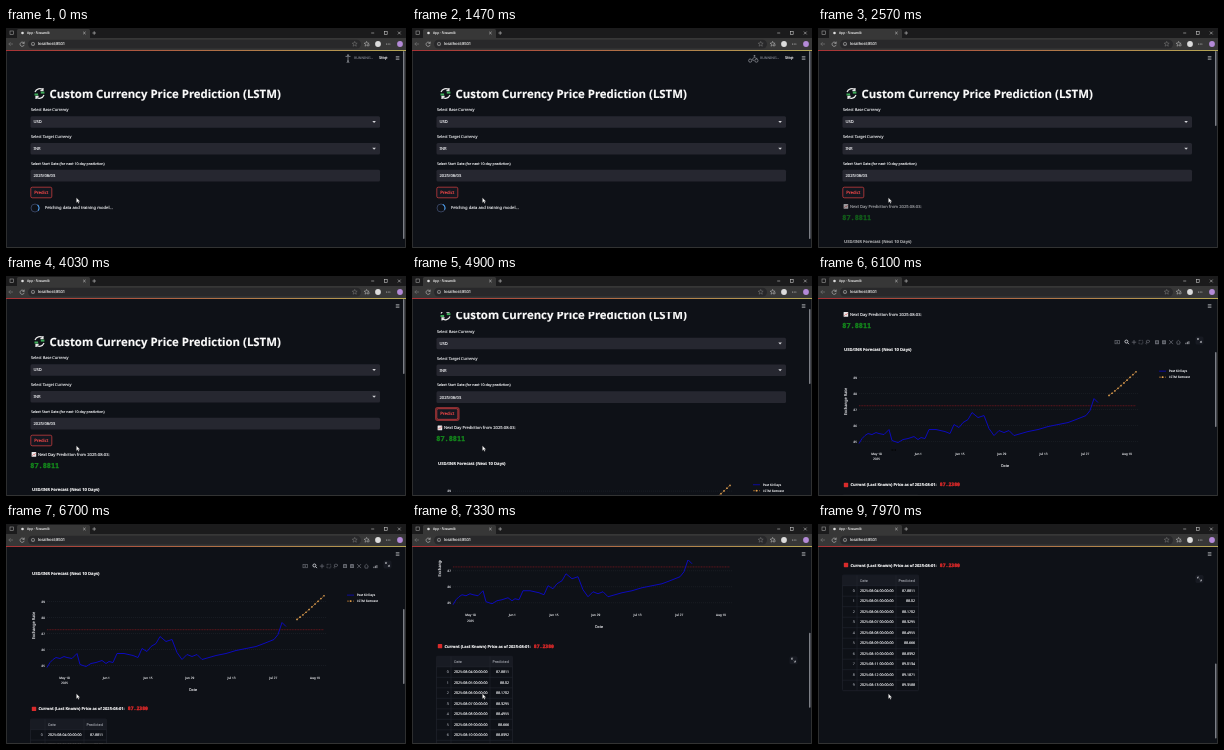
An HTML page for the animation above (8000 ms loop, 400 px wide and 220 px high).

```html
<!DOCTYPE html>
<html lang="en">
<head>
<meta charset="utf-8">
<title>Currency prediction</title>
<style>
  html, body { margin: 0; width: 100%; height: 100%; overflow: hidden; background: #0e1117; }
  svg { display: block; width: 400px; height: 220px; }
  text { font-family: "Noto Sans", "Open Sans", sans-serif; text-rendering: geometricPrecision; white-space: pre; }
  .mono { font-family: "Noto Sans Mono", "DejaVu Sans Mono", monospace; }
</style>
</head>
<body>
<svg id="stage" viewBox="0 0 400 220"></svg>
<script>
const LOOP = 8000, RESULT_AT = 2400, IDLE_AT = 2480;
const BG = '#0e1117', FIELD = '#262730', INK = '#e6e7ea', RED = '#ff4b4b';
const stage = document.getElementById('stage');

function add(parent, tag, attrs = {}) {
  const node = document.createElementNS('http://www.w3.org/2000/svg', tag);
  for (const key in attrs) node.setAttribute(key, attrs[key]);
  parent.append(node);
  return node;
}
const group = (parent, attrs) => add(parent, 'g', attrs);
const rect = (parent, x, y, width, height, fill, more) =>
  add(parent, 'rect', { x, y, width, height, fill, ...more });
const circle = (parent, cx, cy, r, fill, more) => add(parent, 'circle', { cx, cy, r, fill, ...more });
const path = (parent, d, stroke, width = 0.7, more) =>
  add(parent, 'path', { d, stroke, 'stroke-width': width, fill: 'none', ...more });

// y is the middle of the capitals; the thin stroke keeps tiny letters legible
function text(parent, value, x, y, size, fill = INK, more = {}) {
  const node = add(parent, 'text', {
    x, y: y + size * 0.36, 'font-size': size, fill, stroke: fill, 'stroke-width': 0.14, ...more
  });
  node.textContent = value;
  return node;
}
const BOLD = { 'font-weight': 700 };
const MIDDLE = { 'text-anchor': 'middle' };
const END = { 'text-anchor': 'end' };

function expandIcon(parent, y) {
  const icon = group(parent, { transform: `translate(381.5 ${y})` });
  rect(icon, -4, -4, 8, 8, '#171a22', { rx: 1.5 });
  path(icon, 'M-0.5 -0.5 L-1.8 -1.8 M-2 -0.4 V-2 H-0.4 M0.5 0.5 L1.8 1.8 M2 0.4 V2 H0.4', '#c4c6cb', 0.6);
  return icon;
}

rect(stage, 0, 0, 400, 220, BG);
const page = group(stage);

// Form
path(page, 'M29 64 a5 5 0 0 1 8 -2 m0 -2 v2.6 h-2.6 M38 67 a5 5 0 0 1 -8 2 m0 2 v-2.6 h2.6', '#e9e9e9', 1.2);
rect(page, 28.5, 65.5, 3.6, 2, '#3fae5a');
rect(page, 34.8, 63.6, 3.6, 2, '#3fae5a');
text(page, 'Custom Currency Price Prediction (LSTM)', 43.5, 65.5, 11.4, '#fafafa', BOLD);

function field(label, size, value, y, isSelect) {
  text(page, label, 25, y - 12, size);
  rect(page, 24.5, y - 5.8, 349.5, 11.6, FIELD, { rx: 1.5 });
  text(page, value, 27.5, y, 4.1);
  if (isSelect) path(page, `M366.3 ${y - 0.9} h3.6 l-1.8 2 z`, 'none', 0, { fill: '#d5d6da' });
}
field('Select Base Currency', 3.85, 'USD', 94, true);
field('Select Target Currency', 3.85, 'INR', 120.7, true);
field('Select Start Date (for next 10-day prediction)', 3.56, '2025/08/03', 147.6, false);

const focusRing = rect(page, 23.7, 158.2, 23.2, 12.6, 'none',
  { rx: 2, stroke: RED, 'stroke-opacity': 0.5, 'stroke-width': 1.4 });
rect(page, 24.8, 159.2, 21, 10.6, '#131720', { rx: 1.5, stroke: RED, 'stroke-width': 0.6 });
text(page, 'Predict', 35.3, 164.4, 4.3, RED, MIDDLE);

// Waiting state
const waiting = group(page);
circle(waiting, 29, 180, 4, 'none', { stroke: '#34405c', 'stroke-width': 1 });
const spinner = path(waiting, 'M29 176 a4 4 0 0 1 4 4', '#4aa3f5', 1.1);
text(waiting, 'Fetching data and training model...', 39, 180, 4.13);

// Result
const result = group(page);
rect(result, 25.6, 176, 4.6, 4.8, '#e8e8ea', { rx: 0.5 });
path(result, 'M26.3 179.8 l1.2 -1.4 l0.8 0.6 l1.3 -2', '#d64545', 0.6);
text(result, 'Next Day Prediction from 2025-08-03:', 32, 178.5, 4.09);
text(result, '87.8811', 24.3, 189.2, 6.9, '#14891c', { ...BOLD, class: 'mono', 'stroke-width': 0.3 });

// Chart
const details = group(result, { transform: 'translate(0 0.6)' });
const rateY = rate => 273 - 16 * (rate - 87);
text(details, 'USD/INR Forecast (Next 10 Days)', 26, 213, 4.16, '#f4f4f5', BOLD);
for (let rate = 85; rate <= 89; rate++) {
  path(details, `M41 ${rateY(rate)} H320`, '#22262f', 0.5, { 'stroke-dasharray': '1 1' });
  text(details, rate, 39, rateY(rate), 3.1, '#c9cbd0', END);
}
['May 18', 'Jun 1', 'Jun 15', 'Jun 29', 'Jul 13', 'Jul 27', 'Aug 10'].forEach((day, i) =>
  text(details, day, 58.5 + 41.75 * i, 317, 3.1, '#d5d6da', MIDDLE));
text(details, '2025', 58.5, 322.7, 3.1, '#d5d6da', MIDDLE);
text(details, 'Date', 187, 329, 3.7, '#d5d6da', MIDDLE);
text(details, 'Exchange Rate', 27.5, 265, 4, '#d5d6da', { ...MIDDLE, transform: 'rotate(-90 27.5 265)' });

const past = '41,307 44,302 47,299 50,297 54,298 58,296 61,297 66,298 71,293 74,304 80,306 85,303 90,302 ' +
  '96,300 100,303 103,301 107,302 111,293 118,293 127,295 132,297 136,288 141,291 145,286 150,283 154,276 ' +
  '160,281 166,279 171,292 176,299 181,294 186,296 191,294 196,299 203,297 210,295 220,293 230,290 240,288 ' +
  '250,286 258,283 268,279 272,274 276,262 280,266';
path(details, `M41 ${rateY(87.238)} H318`, '#98181f', 0.6, { 'stroke-dasharray': '1 0.6' });
add(details, 'polyline', { points: past, fill: 'none', stroke: '#0c0abc', 'stroke-width': 1 });

const forecast = ['87.8811', '88.02', '88.1702', '88.3295', '88.4955',
  '88.666', '88.8392', '89.0134', '89.1871', '89.3588'];
const forecastPoints = forecast.map((rate, i) => [291 + 3 * i, rateY(rate)]);
add(details, 'polyline', {
  points: forecastPoints.join(' '), fill: 'none', stroke: '#c98436', 'stroke-width': 0.6, 'stroke-dasharray': '2 1'
});
forecastPoints.forEach(([x, y]) => circle(details, x, y, 0.85, '#e2a252'));

path(details, 'M341 234.6 h7', '#0c0abc', 0.8);
text(details, 'Past 60 Days', 351, 234.6, 3.05);
path(details, 'M341 240.6 h7', '#c98436', 0.7, { 'stroke-dasharray': '2 1' });
circle(details, 344.5, 240.6, 0.9, '#e2a252');
text(details, 'LSTM Forecast', 351, 240.6, 3.1);

// Chart tools
const tools = group(result);
const GREY = '#666971';
rect(tools, 297, 204.6, 4.4, 3.2, 'none', { stroke: GREY, 'stroke-width': 0.7 });
circle(tools, 299.2, 206.2, 0.8, GREY);
circle(tools, 308.4, 205.6, 1.5, 'none', { stroke: '#d0d1d6', 'stroke-width': 0.9 });
path(tools, 'M309.6 206.8 l1.4 1.4', '#d0d1d6', 0.9);
path(tools, 'M316 204 v4.4 M313.8 206.2 h4.4', GREY, 0.8);
rect(tools, 321, 204.4, 3.8, 3.6, 'none', { stroke: GREY, 'stroke-width': 0.7, 'stroke-dasharray': '0.8 0.6' });
path(tools, 'M328.5 208.4 q-1 -1 0 -1.6 q-1 -2.6 1.4 -2.6 q2.4 0.2 1.6 1.8 q-1 1.2 -3 0.8', GREY, 0.7);
[339, 346].forEach((x, i) => {
  rect(tools, x - 2, 204.2, 4, 4, GREY, { rx: 0.4 });
  path(tools, `M${x - 1.2} 206.2 h2.4` + (i ? '' : ` M${x} 205 v2.4`), BG, 0.6);
});
path(tools, 'M351.2 204.2 l3.8 4 m0 -4 l-3.8 4', GREY, 0.8);
path(tools, 'M358.2 206.4 l2.2 -2 l2.2 2 M359 206.2 v2 h2.8 v-2', GREY, 0.7);
path(tools, 'M367.9 208.2 v-1.4 M369.4 208.2 v-2.4 M370.9 208.2 v-3', '#a6a8ae', 0.9);
const chartExpand = expandIcon(result, 204.5);

// Price and table
rect(details, 25.8, 346.2, 4.4, 4.4, '#d92b2b', { rx: 0.7 });
text(details, 'Current (Last Known) Price as of 2025-08-01:', 32.4, 348.5, 3.98, '#f4f4f5', BOLD);
text(details, '87.2380', 121.8, 348.2, 4.8, '#e62a2a', { ...BOLD, class: 'mono', 'stroke-width': 0.3 });

const ROW = 10.5, TOP = 358.6, LINE = '#242832';
rect(details, 24.5, TOP, 76, ROW * 11, BG, { stroke: LINE, 'stroke-width': 0.6, rx: 1 });
rect(details, 24.5, TOP, 76, ROW, '#181b23');
path(details, `M39 ${TOP} v${ROW * 11} M78 ${TOP} v${ROW * 11}`, LINE, 0.5);
text(details, 'Date', 42, TOP + 5.2, 3.55, '#92959d');
text(details, 'Predicted', 80.5, TOP + 5.2, 3.7, '#92959d');
forecast.forEach((rate, i) => {
  const y = TOP + ROW * (i + 1);
  path(details, `M24.5 ${y} h76`, LINE, 0.5);
  text(details, i, 36.8, y + 5, 3.55, '#92959d', END);
  text(details, `2025-08-${String(4 + i).padStart(2, '0')} 00:00:00`, 42, y + 5, 3.55);
  text(details, rate, 97, y + 5, 3.55, INK, END);
});
const tableExpand = expandIcon(result, 363);

// App header
rect(stage, 0, 22, 400, 14, BG);
path(stage, 'M389.8 28.6 h3.6 M389.8 30 h3.6 M389.8 31.4 h3.6', '#c8c9cd', 0.6);
const status = group(stage);
const poses = [
  'M342 29 v3 M339.5 28.4 h5 M342 32 l-1 3 M342 32 l1 3',
  'M338.2 32.6 m-1.6 0 a1.6 1.6 0 1 0 3.2 0 a1.6 1.6 0 1 0 -3.2 0 M342.8 32.6 a1.6 1.6 0 1 0 3.2 0 a1.6 1.6 0 1 0 -3.2 0 M341.5 33 l-1 -2 l2 -2 l1.4 1.4 h1.4',
  'M342.4 28.6 l-1 3 l2 1.4 l-0.6 2 M341.4 31.6 l-1 2 h-2 M339.4 30 l3 -1.2 l2.2 1.4',
  'M337.5 33.6 q1.2 -1.2 2.4 0 t2.4 0 t2.4 0 M338.6 32 l3 -2 l2 2'
].map((d, i) => {
  const pose = group(status);
  path(pose, d, '#898c94', 0.8);
  circle(pose, [342, 342.5, 343, 344.8][i], [27.2, 27.8, 27.2, 30.8][i], 0.9, '#898c94');
  return pose;
});
text(status, 'RUNNING...', 348, 30, 3.5, '#767982');
text(status, 'Stop', 373, 30, 3.9, '#f0f0f2');

const thumb = rect(stage, 397, 23, 1.5, 75, '#7c7f86', { rx: 0.7 });

// Browser
const CHROME = '#373737', ICON = '#c4c4c4', DIM = '#7c7c7c';
path(stage, 'M0.4 22 V219.5 H399.6 V22', CHROME, 0.9);
rect(stage, 0, 0, 400, 11, '#1b1b1c');
rect(stage, 11, 1, 73, 11, CHROME, { rx: 1.5 });
rect(stage, 0, 10, 400, 12, CHROME);
rect(stage, 22, 11.8, 333, 8.6, '#28282a', { rx: 4.3 });
rect(stage, 4, 3, 3.4, 3.4, 'none', { stroke: '#9a9a9a', 'stroke-width': 0.6 });
circle(stage, 16.5, 5, 1.3, '#dedede');
text(stage, 'App · Streamlit', 21, 5, 3.3, '#dedede');
path(stage, 'M77.2 3.8 l2.4 2.4 m0 -2.4 l-2.4 2.4', ICON, 0.6);
path(stage, 'M86.4 5 h3.6 m-1.8 -1.8 v3.6', ICON, 0.6);
path(stage, 'M365.2 5 h3 M391.9 3.6 l2.8 2.8 m0 -2.8 l-2.8 2.8', ICON, 0.6);
rect(stage, 378.4, 3.6, 2.8, 2.8, 'none', { stroke: ICON, 'stroke-width': 0.6 });
path(stage, 'M7 16 h-4.2 m1.8 -1.8 l-1.8 1.8 l1.8 1.8', DIM, 0.6);
path(stage, 'M18 15.2 a2.1 2.1 0 1 0 0.2 1.6 M18.2 13.6 v1.8 h-1.8', ICON, 0.6);
circle(stage, 27, 16, 1.7, 'none', { stroke: ICON, 'stroke-width': 0.5 });
path(stage, 'M27 15.7 v1.3', ICON, 0.5);
text(stage, 'localhost:8501', 32, 16, 4, '#dedede');

const star = 'l0.7 1.7 l1.8 0.1 l-1.4 1.2 l0.5 1.8 l-1.6 -1 l-1.6 1 l0.5 -1.8 l-1.4 -1.2 l1.8 -0.1 z';
path(stage, 'M348.7 13.4 ' + star, DIM, 0.5);
path(stage, 'M360.6 13.4 ' + star + ' M362 17 h2', ICON, 0.5);
circle(stage, 372, 16, 2.9, '#dcdcdc');
[380.5, 382.2, 383.9].forEach(x => circle(stage, x, 16, 0.5, ICON));
circle(stage, 394, 16, 2.9, '#b48ad8');
const ribbon = add(add(stage, 'defs'), 'linearGradient', { id: 'ribbon' });
add(ribbon, 'stop', { offset: 0, 'stop-color': '#b93639' });
add(ribbon, 'stop', { offset: 1, 'stop-color': '#c9b85c' });
rect(stage, 0, 22, 400, 0.9, 'url(#ribbon)');

// Pointer
const arrow = path(stage, 'M70.4 169.8 v5 l1.2 -1.1 l0.9 1.8 l0.8 -0.4 l-0.9 -1.7 h1.6 z', '#333', 0.3, { fill: '#fff' });
const resize = path(stage, 'M73.6 174 h4.4 m-1 -1 l1 1 l-1 1 M74.6 173 l-1 1 l1 1', '#000', 0.5);

// Page scroll as [time, offset]
const scrollSteps = [[0, 0], [4420, 0], [4800, 20], [5330, 54], [6100, 140],
  [6700, 164], [7200, 208], [7700, 280], [7960, 308], [LOOP, 308]];

function scrollAt(time) {
  const i = scrollSteps.findIndex(step => step[0] > time);
  const [t0, y0] = scrollSteps[i - 1], [t1, y1] = scrollSteps[i];
  return y0 + (y1 - y0) * (time - t0) / (t1 - t0);
}
const clamp = value => Math.max(0, Math.min(1, value));
const show = (node, opacity) => node.setAttribute('opacity', Number(opacity));

function draw(time) {
  const scroll = scrollAt(time);
  const done = time >= RESULT_AT;
  const overChart = scroll > 30 && scroll < 178;
  const overAxis = scroll > 62 && scroll < 150;

  page.setAttribute('transform', `translate(0 ${-scroll})`);
  spinner.setAttribute('transform', `rotate(${time * 360 / 750 + 40} 29 180)`);
  show(waiting, !done);
  show(result, done ? clamp(0.3 + (time - RESULT_AT) / 500) : 0);
  show(status, time < IDLE_AT);
  poses.forEach((pose, i) => show(pose, Math.floor(time / 250) % poses.length === i));
  show(focusRing, scroll > 0);
  show(tools, overChart ? clamp((scroll - 50) / 25) : 0);
  show(chartExpand, overChart);
  show(tableExpand, scroll > 186);
  show(arrow, !overAxis);
  show(resize, overAxis);
  thumb.setAttribute('y', 23 + scroll * 0.378);
  thumb.setAttribute('height', done ? 75 : 188);
}

const start = performance.now();
function tick() {
  draw((performance.now() - start) % LOOP);
  requestAnimationFrame(tick);
}
tick();
</script>
</body>
</html>
```
